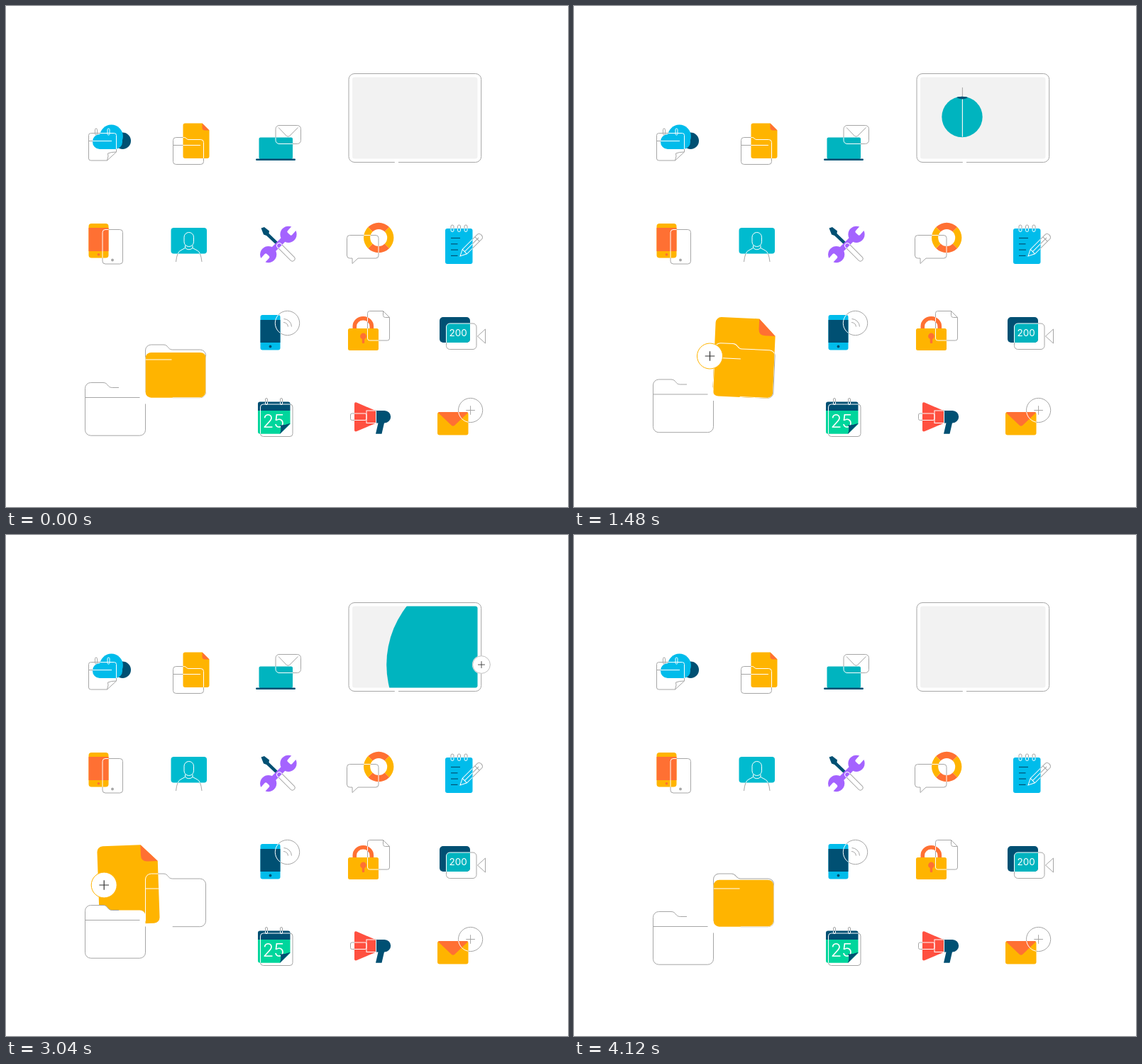
An HTML page for the animation above (4160 ms loop, 792 by 707 pixels).

```html
<!DOCTYPE html>
<html lang="en">
<head>
<meta charset="utf-8">
<title>Icon set</title>
<style>
html, body { margin: 0; width: 100%; height: 100%; overflow: hidden; background: #fff; }
svg { display: block; }
.line { fill: none; stroke: #a6a6a6; }
.white { stroke: #fff; }
.teal { stroke: #00b4bf; stroke-width: 1.4; }
.cross { fill: none; stroke: #333; stroke-width: 1.2; }
.notes { stroke: #005073; stroke-width: 1.2; }
text { font-family: Inter, Roboto, sans-serif; fill: #fff; text-anchor: middle; }
</style>
</head>
<body>
<svg id="stage" width="792" height="707" viewBox="0 0 792 707"></svg>
<script>
const LOOP = 4160, CYCLE = 2080, STEP = 40;
const AMBER = '#ffb400', CORAL = '#ff7033', TEAL = '#00b4bf', AQUA = '#00bbcf', NAVY = '#005073',
      CYAN = '#00bceb', PURPLE = '#a463ff', RED = '#ff5040', GREEN = '#00d69c', GREY = '#a6a6a6';

// --- shapes ---
const fill = f => f ? ` fill="${f}"` : '';
const rect = (x, y, w, h, r = 0, f) =>
  `<rect x="${x}" y="${y}" width="${w}" height="${h}" rx="${r}"${fill(f)}/>`;
const circle = (x, y, r, f) => `<circle cx="${x}" cy="${y}" r="${r}"${fill(f)}/>`;
const path = (d, f) => `<path d="${d}"${fill(f)}/>`;
const dashed = (d, pattern) => `<path d="${d}" stroke-dasharray="${pattern}"/>`;
const turn = (shape, deg, x, y) => shape.replace('/>', ` transform="rotate(${deg} ${x} ${y})"/>`);
const lines = (inner, cls = '') => `<g class="line ${cls}">${inner}</g>`;
const plus = (x, y, s) => path(`M${x - s} ${y}h${2 * s}M${x} ${y - s}v${2 * s}`);
const ring = (x, y) => rect(x - 1.5, y, 3, 9, 1.5);

function sector(x, y, inner, outer, from, f) {
  const at = (r, deg) => `${x + r * Math.cos(deg * Math.PI / 180)} ${y + r * Math.sin(deg * Math.PI / 180)}`;
  const to = from + 90;
  return path(`M${at(outer, from)}A${outer} ${outer} 0 0 1 ${at(outer, to)}L${at(inner, to)}A${inner} ${inner} 0 0 0 ${at(inner, from)}z`, f);
}

// Clockwise from the lower left, so a dash pattern can leave a gap.
const folder = (x, y, w, h, r, tab, drop) =>
  `M${x} ${y + h - r}V${y + r}a${r} ${r} 0 0 1 ${r} ${-r}H${x + tab}c${drop} 0 ${drop * 0.8} ${drop} ${drop * 1.8} ${drop}` +
  `H${x + w - r}a${r} ${r} 0 0 1 ${r} ${r}V${y + h - r}a${r} ${r} 0 0 1 ${-r} ${r}H${x + r}a${r} ${r} 0 0 1 ${-r} ${-r}`;

// Page with its upper right corner cut by c; bend 0 is round, 1 is straight.
function page(x, y, w, h, c, radius, bend = 1) {
  const r = Math.max(0, Math.min(radius, h / 2)), k = bend * c / 2, x2 = x + w;
  if (h < 1) return '';
  return `M${x + r} ${y}H${x2 - c}Q${x2 - k} ${y + k} ${x2} ${y + c}V${y + h - r}a${r} ${r} 0 0 1 ${-r} ${r}` +
    `H${x + r}a${r} ${r} 0 0 1 ${-r} ${-r}V${y + r}a${r} ${r} 0 0 1 ${r} ${-r}z`;
}

// Folded corner that opens from the cut as size goes from 0 to 1.
function flap(x2, y, c, size) {
  const reach = c * (1 + size) / 2, kx = x2 - reach, ky = y + reach;
  const near = (a, b) => a + (b - a) * 0.62;
  return size < 0.02 ? '' :
    `M${x2 - c} ${y}L${near(x2 - c, kx)} ${near(y, ky)}Q${kx} ${ky} ${near(x2, kx)} ${near(y + c, ky)}L${x2} ${y + c}z`;
}

// Outlines are grey on the page and white where they cross a filled shape.
let clips = 0;
function icon(fills, outline, top = '') {
  const id = 'clip' + clips++;
  return lines(outline) + fills + `<clipPath id="${id}">${fills}</clipPath>` +
    `<g clip-path="url(#${id})">${lines(outline, 'white')}</g>` + top;
}

const wrenchEnd = (x, y, side) => circle(x, y, 11.6, PURPLE) +
  turn(rect(x + (side > 0 ? 1 : -15), y - 4.2, 14, 8.4, 2, '#fff'), -48, x, y);
const calendarCurl = path('M386 603.7Q389 597 386.5 591.5Q392 592 400.5 589z', NAVY);

const icons = [
  // cloud and calendar
  icon(circle(164.3, 190.3, 11.7, NAVY) + rect(122, 181, 42, 21, 10, CYAN) + circle(148.5, 184, 16.4, CYAN),
    path('M142.5 218h-23a3 3 0 0 1-3-3v-32.500a3 3 0 0 1 3-3h33a3 3 0 0 1 3 3V206l-13 12q2.500-7 1-10q4.500-2 12-2M116.500 190.500h32.500') +
    ring(127, 173) + ring(144.5, 173)),
  // document and folder
  icon(path(page(249.5, 165.5, 37, 49.5, 10, 3), AMBER) + path(flap(286.5, 165.5, 10, 1), CORAL),
    path(folder(235.5, 185.5, 43, 38, 4, 16, 3) + 'M235.5 196.5h38.5')),
  // laptop and envelope
  icon(rect(356.5, 185.5, 47.5, 30.5, 2, TEAL) + rect(352, 215.5, 56, 2.5, 1.2, NAVY),
    rect(380, 168.5, 35.5, 26, 5) + path('M384 171.5l11.5 12q2 1.500 4 0l12-12')),
  // phones
  icon(rect(116.5, 307, 28, 48.5, 4, AMBER) + rect(116.5, 313, 28, 33, 0, CORAL),
    rect(136, 315.5, 28.5, 48.5, 4),
    circle(130.5, 350.7, 1.8, CORAL) + circle(150, 358.5, 1.9, GREY)),
  // person on a screen
  icon(rect(232.5, 313, 50.5, 36.5, 4, AQUA),
    rect(251, 319.5, 13.5, 20, 6.7) +
    path('M239.5 361q1.500-14 6.500-16l6.500-3.500v-3.500M276 361q-1.500-14-6.500-16l-6.500-3.500v-3.500M252.500 341.500q5.300 4.500 10.500 0')),
  // tools
  icon(path('M359.5 313.5l4.500-1.500 7 5.500-.5 3.500 14.500 14-3 3-15-14-4-1.500z', NAVY) +
    turn(rect(360, 332.5, 48, 8, 0, PURPLE), -45, 384, 336.5) +
    wrenchEnd(398, 322.3, 1) + wrenchEnd(369.7, 350.6, -1),
    turn(rect(378, 343.5, 33, 7, 3.5), 45, 394, 347)),
  // speech bubble and ring
  icon([0, 1, 2, 3].map(i => sector(525.2, 327, 12, 21.2, i * 90 - 135, i % 2 ? AMBER : CORAL)).join(''),
    path('M484.5 323.5h36.500a4 4 0 0 1 4 4v24.500a4 4 0 0 1-4 4h-25l-8 7.500v-7.500h-3.500a4 4 0 0 1-4-4v-24.500a4 4 0 0 1 4-4')),
  // notepad and pencil
  icon(rect(619, 314, 38.5, 50, 3, CYAN),
    [629, 638.5, 648].map(x => rect(x - 2, 309, 4, 9.5, 2)).join('') +
    turn(path('M640 353l9-4.500h30.500a5 5 0 0 1 0 9h-30.500zM649 348.500v9M649 353h28M674 348.500v9'), -45, 640, 353),
    `<g class="notes">${[13, 9.5, 10, 9.5].map((w, i) => path(`M627 ${327.5 + i * 8.3}h${w}`)).join('')}</g>`),
  // phone and signal
  icon(rect(358.5, 436, 28, 49.5, 3, CYAN) + rect(358.5, 443, 28, 32, 0, NAVY),
    circle(396.5, 447.5, 17.2) + path('M391 446.5a7 7 0 0 1 6.500 6M391.500 441.500a11.500 11.500 0 0 1 11 11'),
    circle(372.5, 480.5, 1.9, NAVY)),
  // padlock and page
  icon(path('M488.5 456v-4a14.800 14 0 0 1 29.600 0v4h-5.600v-4a9.200 8.500 0 0 0-18.400 0v4z', CORAL) +
    rect(482, 455, 43, 31, 2.5, AMBER) + circle(503.5, 466, 4.4, CORAL) + rect(501.8, 466, 3.4, 10, 1, CORAL),
    path(page(509.5, 430.5, 31, 41.5, 9, 3) + 'M531.5 430.5v6a3 3 0 0 0 3 3h6')),
  // camera
  icon(rect(611, 439, 43, 36, 5, NAVY) + path('M620.5 475v-22a5 5 0 0 1 5-5H654v22a5 5 0 0 1-5 5z', TEAL),
    rect(620.5, 448, 42.5, 36.5, 5) + path('M664.5 466l11-10v20z'),
    '<text x="637.2" y="466.2" font-size="13.5">200</text>'),
  // calendar
  icon(path('M355 571v-9.500a3 3 0 0 1 3-3h39.500a3 3 0 0 1 3 3v9.500z', NAVY) +
    path('M355 571h45.500v19l-14.500 13.700h-28a3 3 0 0 1-3-3z', GREEN) + calendarCurl,
    rect(358.5, 562, 45.5, 45.5, 4) + ring(367, 553.5) + ring(388, 553.5),
    '<text x="377" y="595.3" font-size="26" font-weight="300">25</text>' + calendarCurl),
  // megaphone
  icon(path('M491 561.5q0-3 3-2l29 12.500v16l-29 12.300q-3 .7-3-1.800z', RED) +
    path('M521.5 571h12a8.700 8.700 0 0 1 0 17.400h-.5l-3.500 15.300h-8.500l3.500-15.300h-3z', NAVY),
    rect(485.5, 575, 22.5, 9.5, 2) + rect(508, 571, 13.5, 17.5)),
  // mail
  icon(rect(608, 573, 43.5, 32.5, 3, AMBER) + path('M609 574q1-1 2-1h38q1.500 0 2 1l-19 18q-2 1.500-4 0z', CORAL),
    circle(654.6, 570.5, 17.1) + plus(654.6, 570.5, 6.3))
];

// --- moving parts ---
const bigFolder = (x, y) => folder(x, y, 85, 74.7, 8, 25.5, 7);
const rightFolder = dashed(bigFolder(196.5, 478), '258 999');
const leftFolder = bigFolder(111.5, 531.5);
const CABLE = 'M574 221v9a13.3 13.3 0 0 1-26.600 0V95';
const TRACE = 'M547.4 95h114.600a8 8 0 0 1 8 8v63';
const CABLE_LEN = 186, TRACE_LEN = 190, PLUGGED = 102, DISC_EXIT = 96;

const badge = (name, arc, color) => `<g id="${name}">
  <circle r="18" fill="#fff"/><path id="${name}Arc" d="${arc}" pathLength="100" fill="none" stroke="${color}"/>
  <g class="cross">${plus(0, 0, 6.8)}</g></g>`;

const screen = rect(488, 100.5, 176.5, 115, 3, '#f2f2f2');
const stage = document.getElementById('stage');
stage.innerHTML = icons.join('') + `
  ${screen}
  <clipPath id="screen">${screen}</clipPath>
  <clipPath id="disc"><circle id="discClip" cx="547" cy="156.5"/></clipPath>
  <g clip-path="url(#screen)"><circle id="wipe" cx="670" cy="183" fill="${TEAL}"/></g>
  ${lines(rect(483, 95.5, 186.7, 125, 8))}
  ${rect(547.8, 219, 5.2, 3, 0, '#fff')}
  <circle id="hub" cx="547" cy="156.5" fill="${TEAL}"/>
  <path id="cable" class="line" d="${CABLE}"/>
  <g clip-path="url(#disc)">
    <path id="cableIn" class="line white" d="${CABLE}"/>
    <g id="plug">${rect(537.3, 142.3, 20.7, 12, 3, '#fff')}${path('M532.5 152q0-1.500 1.500-1.500h26.500q1.500 0 1.500 1.500v13a14.750 15 0 0 1-29.500 0z', NAVY)}</g>
  </g>
  <path id="trace" class="line teal" d="${TRACE}"/>
  ${badge('screenPlus', 'M0 17.1A17.1 17.1 0 0 1 0-17.1A17.1 17.1 0 0 1 0 17.1', GREY)}
  <g id="folder">${lines(rightFolder)}</g>
  <path id="level" fill="${AMBER}"/><path id="page" fill="${AMBER}"/><path id="flap" fill="${CORAL}"/>
  <clipPath id="yellow"><path id="levelClip"/><path id="pageClip"/></clipPath>
  <g clip-path="url(#yellow)"><g id="folderIn">${lines(rightFolder + path('M196.5 499h37'), 'white')}</g></g>
  <g id="left">${path(leftFolder, '#fff')}${lines(dashed(leftFolder, '113 57 999') + path('M111.5 552.5h77'))}</g>
  ${badge('pagePlus', 'M18 0A18 18 0 0 0-18 0A18 18 0 0 0 18 0', AMBER)}`;

const el = {};
for (const node of stage.querySelectorAll('[id]')) el[node.id] = node;
const set = (name, attr, value) => el[name].setAttribute(attr, value);

// --- timing ---
const ramp = (t, from, to) => Math.min(1, Math.max(0, (t - from) / (to - from)));
const ease = (t, from, to) => { const p = ramp(t, from, to); return p * p * (3 - 2 * p); };
const show = (t, in0, in1, out0, out1) => ease(t, in0, in1) - ease(t, out0, out1);

function dash(name, offset, length, from, to) {
  const a = Math.max(0, from - offset), b = Math.min(length, to - offset);
  set(name, 'visibility', b > a ? 'visible' : 'hidden');
  if (b > a) set(name, 'stroke-dasharray', `0 ${a} ${b - a} 999`);
}

function place(name, x, y, scale, arc) {
  set(name, 'transform', `translate(${x} ${y}) scale(${scale})`);
  set(name, 'visibility', scale > 0.01 ? 'visible' : 'hidden');
  set(name + 'Arc', 'stroke-dasharray', arc >= 1 ? 'none' : `${arc * 100} 200`);
  set(name + 'Arc', 'stroke-opacity', arc > 0 ? 1 : 0);
}

function drawScreen(t) {
  const hub = 43.3 * show(t, 0, 400, 1320, 1730);
  set('hub', 'r', hub);
  set('discClip', 'r', hub);
  set('plug', 'transform', `translate(0 ${62 * (1 - ease(t, 260, 600)) - 70 * ease(t, 1240, 1620)})`);

  const end = CABLE_LEN + TRACE_LEN;
  const head = PLUGGED * ease(t, 200, 600) + (end - PLUGGED) * ease(t, 1280, 1920);
  const tail = DISC_EXIT * ease(t, 1200, 1480) + (end - DISC_EXIT) * ramp(t, 1480, 2240) ** 1.5;
  dash('cable', 0, CABLE_LEN, tail, head);
  dash('cableIn', 0, CABLE_LEN, tail, head);
  dash('trace', CABLE_LEN, TRACE_LEN, tail, head);

  set('wipe', 'r', 212 * show(t, 2280, 2520, 2900, 3240));
  const press = 0.08 * Math.sin(Math.PI * ramp(t, 2240, 2480));
  place('screenPlus', 670, 183, show(t, 1720, 1900, 2880, 3340) + press, ramp(t, 1920, 2200));
}

function drawFolders(t) {
  const lift = ease(t, 500, 680), glide = ease(t, 1200, 1500), drop = ease(t, 1840, 2070);
  const sway = show(t, 1360, 1520, 1640, 2080);

  const level = 489 + 63.7 * ramp(t, 0, 680) ** 4;
  const levelPath = page(196.5, level, 85, 552.7 - level, 8, 8, 0);

  const x = 154 + 18.5 * lift + 66.5 * glide + 2 * sway;
  const y = 545 - 107 * lift + 3 * sway + 51 * drop;
  const base = 590 - 41 * lift + 3.7 * ease(t, 1360, 1520);
  const cut = 23.5 - 15.5 * drop;
  const tilt = 3 * sway - 2 * (lift - ease(t, 1160, 1360));
  const pagePath = lift > 0 ? page(x - 42.4, y, 84.8, base - y, cut, 8, (1 - drop) ** 2) : '';
  const spin = `rotate(${tilt} ${x} ${(y + base) / 2})`;

  for (const name of ['level', 'levelClip']) set(name, 'd', levelPath);
  for (const name of ['page', 'pageClip']) set(name, 'd', pagePath);
  for (const name of ['page', 'pageClip', 'flap']) set(name, 'transform', spin);
  set('flap', 'd', flap(x + 42.4, y, cut, show(t, 720, 960, 1720, 1900)));

  for (const name of ['folder', 'folderIn'])
    set(name, 'transform', `translate(0 ${-sway}) rotate(${3 * sway} 240 530)`);
  set('left', 'transform', `translate(0 ${-9 * show(t, 480, 680, 1400, 1560)})`);
  place('pagePlus', 138.2 + 54 * glide, 494, show(t, 400, 480, 1680, 1840), show(t, 440, 660, 1640, 1800));
}

const start = performance.now();
function frame() {
  const t = Math.floor(((performance.now() - start) % LOOP) / STEP) * STEP;
  drawScreen(t);
  drawFolders(t % CYCLE);
  requestAnimationFrame(frame);
}
frame();
</script>
</body>
</html>
```
